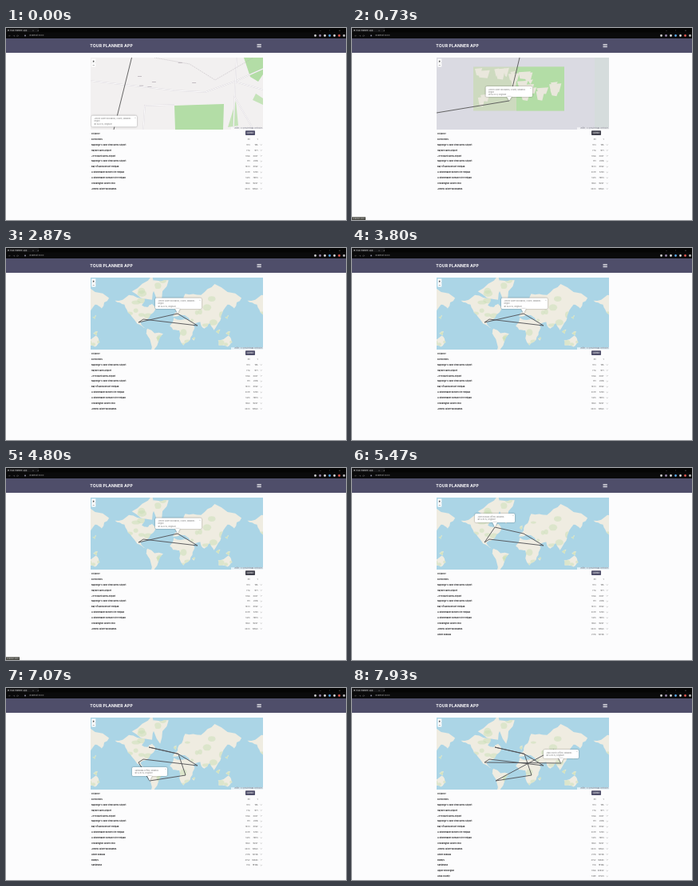
These frames come from a looping animation (426x240 px, 8 s). An HTML page with a canvas:

```html
<!DOCTYPE html>
<html lang="en">
<head>
<meta charset="utf-8">
<title>Tour Planner App</title>
<style>
  html, body { margin: 0; width: 100%; height: 100%; overflow: hidden; background: #fcfcfd; }
  canvas { display: block; width: 100vw; height: 100vh; }
</style>
</head>
<body>
<canvas></canvas>
<script>
const canvas = document.querySelector('canvas');
const ctx = canvas.getContext('2d');
const LOOP = 8000;
const MAP = { x: 106, y: 37, w: 216, h: 90 };
const SANS = 'Inter, "Open Sans", sans-serif';
const ACCENT = '#4f4e6a';
const PARK = '#b3dda6';

const names = [
  'KOTR miles', "Napongo's Cash Find Farms Airport", 'Hayder Farm Airport', 'J P Hobart Farms Airport',
  "Napongo's Cash Find Farms Airport", 'Bay of Sands Resort Helipad', 'A Stonemaker Border Fire Helipad',
  'A Stonemaker Furnace Fire Helipad', 'Crookington Glider Field', 'Johnny Glider Woodlands',
  'Aiden Kokuda', 'Palmys', 'Santanalla', 'Upper Rio Region', 'Aiwa County',
];
const FIRST_ROWS = 10;

const baseTour = [[166,93], [172,89], [240,97], [215,82]];
const newStops = [
  { at: 5400, point: [179,74] },
  { at: 6500, point: [225,109] },
  { at: 6950, point: [180,116] },
  { at: 7300, point: [253,77] },
  { at: 7650, point: [262,94] },
];

function seeded(seed) {
  return () => (seed = (seed * 16807) % 2147483647) / 2147483647;
}

function rect(x, y, w, h, color) {
  ctx.fillStyle = color;
  ctx.fillRect(x, y, w, h);
}

function roundedRect(x, y, w, h, r, color) {
  ctx.fillStyle = color;
  ctx.beginPath();
  ctx.roundRect(x, y, w, h, r);
  ctx.fill();
}

function ellipse(x, y, rx, ry, color) {
  ctx.fillStyle = color;
  ctx.beginPath();
  ctx.ellipse(x, y, rx, ry, 0, 0, 7);
  ctx.fill();
}

function text(value, x, y, size, color, weight = 400, align = 'left') {
  ctx.font = `${weight} ${size}px ${SANS}`;
  ctx.textAlign = align;
  ctx.fillStyle = color;
  ctx.fillText(value, x, y);
}

function trace(points, closed) {
  ctx.beginPath();
  points.forEach(([x, y]) => ctx.lineTo(x, y));
  if (closed) ctx.closePath();
}

function line(points, color, width, closed = false) {
  trace(points, closed);
  ctx.strokeStyle = color;
  ctx.lineWidth = width;
  ctx.stroke();
}

function area(points, color) {
  trace(points, true);
  ctx.fillStyle = color;
  ctx.fill();
}

function route(points, closed) {
  line(points, '#505054', 0.9, closed);
}

// A path that drifts from a start point in one heading.
function wander(random, x, y, heading, step, count) {
  const path = [[x, y]];
  for (let i = 0; i < count; i++) {
    heading += (random() - 0.5) * 1.1;
    path.push([x += Math.cos(heading) * step, y += Math.sin(heading) * step]);
  }
  return path;
}

// Roughens an outline by displacing the middle of every edge.
function coast(points, random, depth = 2) {
  if (!depth) return points;
  const rough = points.flatMap(([x, y], i) => {
    const [nx, ny] = points[(i + 1) % points.length];
    const push = (random() - 0.5) * 0.3;
    return [[x, y], [(x + nx) / 2 + (ny - y) * push, (y + ny) / 2 - (nx - x) * push]];
  });
  return coast(rough, random, depth - 1);
}

function project([lon, lat]) {
  const sine = Math.sin(lat * Math.PI / 180);
  return [213 + lon * 166 / 360, 104.5 - 26.4 * Math.atanh(sine)];
}

function island(lon, lat, size) {
  return [[lon - size, lat], [lon + size, lat + size], [lon + size / 2, lat - size]];
}

// Key points in longitude and latitude.
const northAmerica = [[-166,64], [-128,70], [-82,68], [-93,58], [-78,55], [-65,60], [-56,51],
  [-81,30], [-97,24], [-80,8], [-106,21], [-124,42], [-140,59]];
const greenland = [[-62,80], [-20,80], [-43,60]];
const arcticIsles = [[-120,73], [-65,82], [-65,65]];
const southAmerica = [[-78,8], [-35,-6], [-48,-27], [-69,-54], [-71,-20], [-81,-5]];
const africa = [[-6,35], [33,31], [51,11], [40,-15], [20,-35], [9,3], [-8,5], [-17,15]];
const eurasia = [[-9,38], [5,50], [8,58], [25,71], [68,70], [105,78], [178,67], [158,53], [140,59],
  [122,38], [120,28], [103,4], [92,22], [77,8], [66,25], [45,13], [35,34], [27,39], [12,42]];
const australia = [[114,-23], [142,-11], [153,-28], [140,-38], [116,-35]];
const islands = [island(-3, 54, 4), island(138, 36, 5), island(114, 0, 6), island(141, -5, 6), island(47, -19, 4)];
const coastRandom = seeded(9);
const lands = [northAmerica, greenland, arcticIsles, southAmerica, africa, eurasia, australia, ...islands]
  .map(outline => coast(outline.map(project), coastRandom));

function worldMap() {
  rect(MAP.x, MAP.y, MAP.w, MAP.h, '#abd5e6');
  for (const offset of [-166, 0, 166]) {
    const random = seeded(5);
    ctx.save();
    ctx.translate(offset, 0);
    for (const land of lands) {
      area(land, '#efece1');
      ctx.save();
      ctx.clip();
      for (let i = 0; i < land.length / 8; i++) {
        const [ax, ay] = land[Math.floor(random() * land.length)];
        const [bx, by] = land[Math.floor(random() * land.length)];
        ellipse((ax + bx) / 2, (ay + by) / 2, 2 + random() * 4, 1.5 + random() * 3, '#c9dfb680');
      }
      ctx.restore();
    }
    ctx.restore();
  }
}

function closeMap() {
  rect(MAP.x, MAP.y, MAP.w, MAP.h, '#f2f0f0');
  area([[211,97], [240,96], [273,95], [272,127], [212,127]], PARK);
  area([[298,37], [322,37], [322,58], [316,67], [306,61]], PARK);
  area([[288,91], [291,122], [278,124]], '#c5e3b9');
  area([[313,82], [322,88], [322,96], [309,90]], '#c5e3b9');
  const roads = [
    [[106,66], [211,78], [250,80], [286,67], [322,51]],
    [[172,127], [174,97], [211,96]],
    [[289,37], [287,75], [285,127]],
    [[286,85], [310,127]],
    [[286,67], [322,77]],
  ];
  roads.forEach(path => {
    line(path, '#d5d0d6', 1.5);
    line(path, '#fff', 0.9);
  });
  ctx.setLineDash([1, 1]);
  line([[186,37], [230,45], [262,65], [310,37]], '#b4aeb4', 0.6);
  ctx.setLineDash([]);
  const random = seeded(4);
  for (let i = 0; i < 6; i++) rect(165 + random() * 95, 40 + random() * 38, 5, 0.8, '#b7b0b7');
  line([[157.5,37], [135,127]], '#555', 0.9);
}

function regionMap() {
  rect(MAP.x, MAP.y, MAP.w, MAP.h, '#dadae2');
  rect(152, 48.5, 114, 55, '#cddabf');
  rect(206, 48.5, 60, 55, PARK);
  const random = seeded(23);
  for (let i = 0; i < 24; i++) {
    const x = 154 + random() * 96, y = 50 + random() * 42;
    const w = 5 + random() * 11, h = 4 + random() * 9;
    area([[x, y], [x + w, y - 1], [x + w - 3, y + h], [x + 2, y + h - 1]], '#e9e7dc');
  }
  rect(304, 37, 18, 90, '#d5dcdc');
  line([[106,106], [197,91], [210,37]], '#555', 0.9);
}

function countryMap() {
  rect(MAP.x, MAP.y, MAP.w, MAP.h, '#e5e4e4');
  ellipse(205, 82, 82, 44, '#ebe9dc');
  ellipse(240, 90, 42, 32, '#d3e3c8');
  ellipse(241, 94, 26, 23, '#c5deba');
  const random = seeded(71);
  for (let i = 0; i < 95; i++) {
    const path = wander(random, 108 + random() * 200, 38 + random() * 88, random() * 6.3, 5, 7);
    line(path, i % 3 ? '#a9a6b680' : '#d2bf9f80', 0.6);
  }
  route([[133,95], [213,80], [270,117]]);
}

const gliderLabel = ['Johnny Glider Woodlands, County, Midlands', 'Region', 'lat 46.20 N, longitude'];
const scenes = [
  { start: 0, draw: closeMap, box: [107, 109.5, 57, 14] },
  { start: 500, draw: regionMap, box: [167.5, 73, 58.5, 13], tip: [197, 91] },
  { start: 1500, draw: countryMap, box: [184, 63, 58.5, 13], tip: [213, 80] },
  { start: 2600, draw: worldMap, box: [187, 62.5, 58, 13.5], tip: [215, 82] },
];

function popup([x, y, w, h], label, tip) {
  ctx.save();
  ctx.shadowColor = '#0007';
  ctx.shadowBlur = 2 * canvas.width / 426;
  roundedRect(x, y, w, h, 1.5, '#fff');
  if (tip) area([[tip[0] - 3, y + h - 0.1], tip, [tip[0] + 3, y + h - 0.1]], '#fff');
  ctx.restore();
  label.forEach((part, i) => text(part, x + 3.5, y + 4.8 + i * 3.1, 2.2, '#777'));
  text('×', x + w - 3, y + 3.2, 2.8, '#999');
}

function drawTour(stops) {
  const points = stops.map(stop => stop.point);
  if (points.length > 1) points.splice(1, 0, [216,82.5]);
  route([...baseTour, ...points], true);
}

function drawMap(t, stops) {
  const index = scenes.findLastIndex(scene => t >= scene.start);
  const scene = scenes[index], next = scenes[index + 1];
  const zoomOut = next ? Math.max(0, (t - next.start + 200) / 200) : 0;
  ctx.save();
  ctx.beginPath();
  ctx.rect(MAP.x, MAP.y, MAP.w, MAP.h);
  ctx.clip();
  rect(MAP.x, MAP.y, MAP.w, MAP.h, '#dcdde0');
  ctx.save();
  ctx.translate(214, 82);
  ctx.scale(2 ** -zoomOut, 2 ** -zoomOut);
  ctx.translate(-214, -82);
  scene.draw();
  ctx.restore();

  if (!next) drawTour(stops);
  if (stops.length) {
    const tip = stops.at(-1).point;
    const w = stops.length === 1 ? 50 : 44;
    const name = names[FIRST_ROWS + stops.length - 1];
    popup([tip[0] - w / 2, tip[1] - 17, w, 11], [`${name} Airfield, Midlands`, 'lat 53.90 N, longitude'], tip);
  } else {
    popup(scene.box, gliderLabel, scene.tip);
  }

  rect(107.3, 38.5, 5, 10, '#fff');
  rect(107.3, 43.4, 5, 0.3, '#bbb');
  text('+', 109.8, 42.6, 4.5, '#222', 700, 'center');
  text('−', 109.8, 47.6, 4.5, '#777', 700, 'center');
  rect(282, 124.3, 40, 2.7, '#ffffffb0');
  text('Leaflet | © OpenStreetMap contributors', 321.5, 126.4, 1.9, '#667', 400, 'right');
  ctx.restore();
}

function drawBrowser() {
  rect(0, 0, 426, 13, '#050505');
  rect(0, 0, 41, 5.3, '#151517');
  rect(0, 5.3, 426, 7.7, '#0a0a0b');
  ellipse(3, 2.8, 0.9, 0.9, '#aaa');
  text('Tour Planner App', 5, 3.8, 2.6, '#ddd');
  text('×', 33, 3.9, 3, '#aaa');
  text('+', 39, 4, 3.4, '#bbb');
  text('←  →  ⟳', 3, 10.6, 3.4, '#777');
  ellipse(24, 9.4, 1, 1, '#889');
  text('localhost:3000', 29, 10.4, 2.6, '#aaa');
  ['−', '▫', '×'].forEach((sign, i) => text(sign, 393 + i * 12, 3.8, 3, '#bbb'));
  ['#ccc', '#98a', '#ddd', '#57a9ee', '#ddd', '#e65b50', '#bbb']
    .forEach((color, i) => ellipse(387.5 + i * 6, 9.5, 1.4, 1.4, color));
  rect(0, 13, 426, 18, ACCENT);
  ctx.letterSpacing = '0.15px';
  text('TOUR PLANNER APP', 105.3, 24, 5.1, '#fff', 700);
  ctx.letterSpacing = '0px';
  for (let i = 0; i < 3; i++) rect(314.5, 20 + i * 1.7, 5.3, 0.8, '#fff');
}

function drawTable(added, hover) {
  text('Distance', 107, 132.8, 2.5, '#222', 600);
  roundedRect(300, 128.3, 12, 5.7, 0.8, hover ? '#40404c' : ACCENT);
  text('Optimize', 306, 132, 2.1, '#fff', 500, 'center');
  const random = seeded(17);
  let total = 1;
  names.slice(0, FIRST_ROWS + added).forEach((name, i) => {
    const y = 140 + i * 6.87;
    const leg = Math.floor(100 + random() * i * 400);
    if (i) total += leg;
    text(name, 107, y, 2.5, '#1d1d1f', 700);
    text(i ? leg : 'mi', 305.5, y, 2.5, '#666', 400, 'right');
    text(total, 315.5, y, 2.5, '#555', 400, 'right');
    if (i) line([[318.5, y - 1.4], [319.7, y - 0.4], [320.9, y - 1.4]], '#888', 0.4);
  });
}

function render(now) {
  const t = now % LOOP;
  const scale = window.devicePixelRatio || 1;
  const width = Math.round(innerWidth * scale), height = Math.round(innerHeight * scale);
  if (canvas.width !== width || canvas.height !== height) {
    canvas.width = width;
    canvas.height = height;
  }
  ctx.setTransform(width / 426, 0, 0, height / 240, 0, 0);
  rect(0, 0, 426, 240, '#fcfcfd');
  const stops = newStops.filter(stop => t >= stop.at);
  const hover = (t >= 500 && t < 2600) || (t >= 4300 && t < 5400);
  drawBrowser();
  drawMap(t, stops);
  drawTable(stops.length, hover);
  if (hover) {
    rect(0, 236.3, 17, 3.7, '#4a4a44');
    text('localhost:3000', 1, 239, 2.1, '#ccc');
  }
  requestAnimationFrame(render);
}
requestAnimationFrame(render);
</script>
</body>
</html>
```
